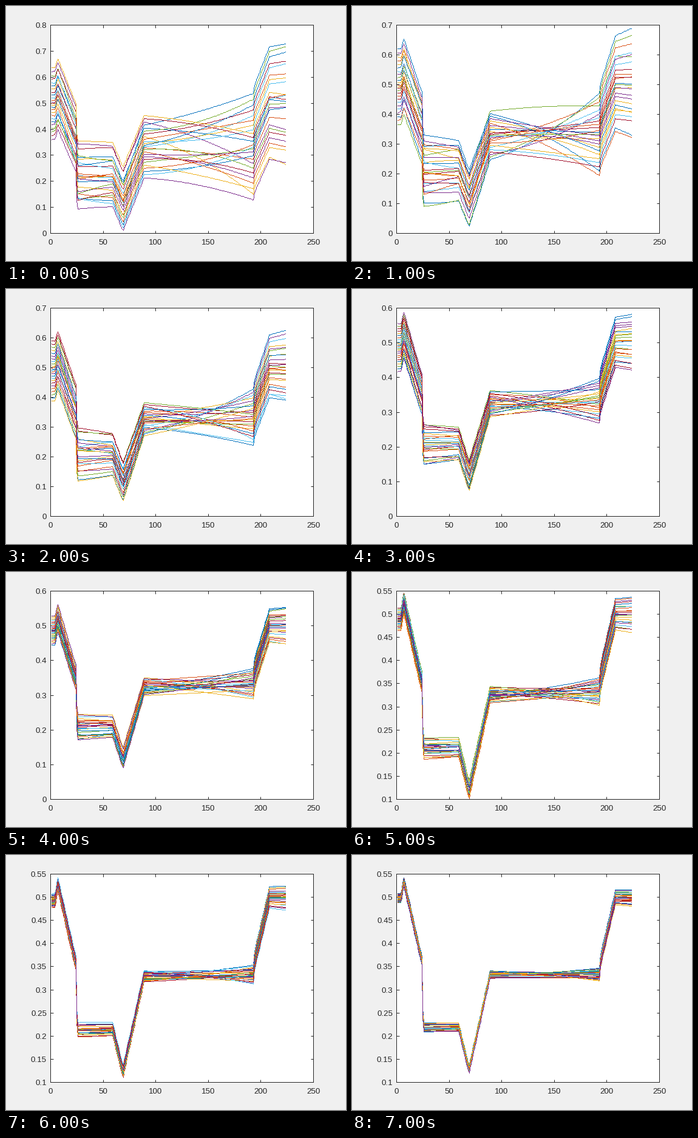
A matplotlib script for the animation above (8 s loop, 560 by 420 pixels).

```python
import numpy as np
import matplotlib.pyplot as plt
from matplotlib.animation import FuncAnimation
from matplotlib.transforms import IdentityTransform

W, H, DPI = 560, 420, 100
PX = 72 / DPI                      # one pixel in points
LEFT, RIGHT, TOP, BOTTOM = 73, 506, 31, 374
INK = "#262626"
COLORS = ["#0072bd", "#d95319", "#edb120", "#7e2f8e",
          "#77ac30", "#4dbeee", "#a2142f"]
COUNT, STEPS = 25, 8

X = np.arange(1, 225)
# the curve on which the ensemble converges
BASE = np.interp(
    X,
    [1, 4, 7, 24, 25, 26, 59, 68, 69, 89, 193, 194, 208, 224],
    [.498, .498, .532, .362, .25, .218, .219, .134, .128, .333,
     .333, .363, .5, .499])
ANCHORS = (1, 89, 193)             # where a curve's offset is chosen
BENT_X = np.where(X > 193, 193 + (X - 193) / 2, X)


def ranks(values):
    return np.argsort(np.argsort(values))


def ensemble(n):
    """All curves at iteration n: base plus a shrinking quadratic offset."""
    rng = np.random.default_rng(20 + n)
    u = np.linspace(-1, 1, COUNT)
    shape = np.sign(u) * abs(u) ** 1.3
    bias = -.012 * np.sin(np.pi * n / (STEPS - 1))
    decay = .68 ** n

    # the middle follows the start; the end soon turns against it
    link = max(.4 - .6 * n, -.8)
    mid_rank = ranks(shape + rng.normal(0, .35, COUNT))
    end_rank = ranks(link * shape + rng.normal(0, .5, COUNT))
    start = bias + (.13 * np.exp(-n * n / 12) + .008) * shape
    mid = .7 * bias + .12 * decay * shape[mid_rank]
    end = .205 * decay * shape[end_rank]

    offsets = rng.permutation(np.column_stack([start, mid, end]))
    offsets = np.roll(offsets, -offsets[:, 2].argmax(), axis=0)
    return np.array([BASE + np.polyval(np.polyfit(ANCHORS, row, 2), BENT_X)
                     for row in offsets])


def limits(n, curves):
    low, tick = (0, .1) if n < 5 else (.1, .05)
    return low, tick * np.ceil(curves.max() / tick), tick


def trace(x, y):
    """Whole-pixel points of a one pixel wide line through the vertices."""
    x, y = np.rint(x).astype(int), np.rint(y).astype(int)
    dx, dy = np.diff(x), np.diff(y)
    n = np.maximum(abs(dx), abs(dy))
    seg = np.repeat(np.arange(len(n)), n)
    t = (np.arange(n.sum()) - (np.cumsum(n) - n)[seg]) / n[seg]
    return np.rint(x[seg] + dx[seg] * t), np.rint(y[seg] + dy[seg] * t)


def to_row(value, low, high):
    return BOTTOM - (value - low) / (high - low) * (BOTTOM - TOP)


def to_column(value):
    return LEFT + value / 250 * (RIGHT - LEFT)


plt.rcParams["font.family"] = "Liberation Sans"
fig = plt.figure(figsize=(W / DPI, H / DPI), dpi=DPI, facecolor="#f0f0f0")
ax = fig.add_axes([LEFT / W, 1 - BOTTOM / H,
                   (RIGHT - LEFT) / W, (BOTTOM - TOP) / H])
ax.set_xlim(0, 250)
ax.set_xticks(range(0, 251, 50))
ax.tick_params(direction="in", top=True, right=True, length=4.5 * PX,
               width=PX, color=INK, labelbottom=False, labelleft=False)
for spine in ax.spines.values():
    spine.set(linewidth=PX, edgecolor=INK)


def label(x, y, text, ha):
    """Text with its baseline at pixel (x, y), y counted from the top."""
    return fig.text(x, H - y, text, ha=ha, va="baseline", color=INK,
                    fontsize=13.33 * PX, transform=IdentityTransform())


for value in range(0, 251, 50):
    label(to_column(value), 393, str(value), "center")
y_labels = [label(67, 0, "", "right") for _ in range(10)]
# pixel markers keep the curves thin and hard-edged
lines = [ax.plot([], [], linestyle="none", marker=",", color=COLORS[i % 7],
                 transform=IdentityTransform())[0] for i in range(COUNT)]


def draw(n):
    curves = ensemble(n)
    low, high, tick = limits(n, curves)
    ticks = np.linspace(low, high, round((high - low) / tick) + 1)
    ax.set_ylim(low, high)
    ax.set_yticks(ticks)
    for text in y_labels:
        text.set_text("")
    for text, value in zip(y_labels, ticks):
        text.set_text(f"{value:.3g}")
        text.set_y(H - round(to_row(value, low, high) + 5))
    for line, curve in zip(lines, curves):
        line.set_data(*trace(to_column(X), H - 1 - to_row(curve, low, high)))
    return lines + y_labels


anim = FuncAnimation(fig, draw, frames=STEPS, interval=1000,
                     repeat=True, repeat_delay=0, blit=False)
plt.show()
```
